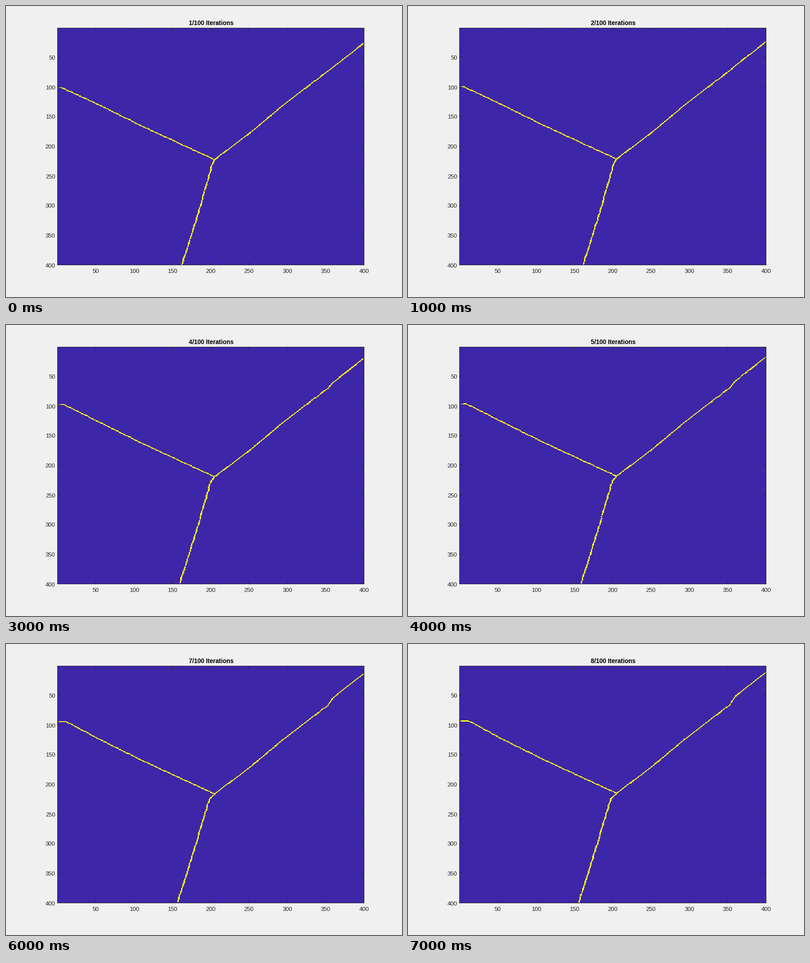
These frames come from a looping animation (873x641 px, 8 s). A matplotlib script:

```python
import numpy as np
import matplotlib.pyplot as plt
from matplotlib.animation import FuncAnimation
from matplotlib.colors import ListedColormap

W, H, DPI = 873, 641, 64
PX = 72 / DPI
LEFT, RIGHT, TOP, BOTTOM = 114, 790, 48, 571
N, STEPS = 400, 8
CW, CH = (RIGHT - LEFT) / N, (BOTTOM - TOP) / N
INK = "#262626"

rng = np.random.default_rng(4)
cells = np.arange(N)


def jitter(run, size):
    """Fixed roughness: one random offset per run of cells."""
    return np.repeat(rng.uniform(-size, size, N // run + 1), run)[:N]


ROUGH = [jitter(5, 0.4), jitter(6, 0.3), jitter(7, 0.4)]


def arms(k):
    """Key points of the three borders after k steps, in stage pixels."""
    rise, slide = 1.37 * k, 1.65 * k
    hub = (460, 338.5 - rise)
    west = [(112, 179 - rise), (121 + 1.9 * k, 179 - rise),
            (208, 219 - rise), (305, 267 - rise), hub]
    east = [hub, (536, 281 - rise), (619, 212 - rise), (709, 144 - rise),
            (722, 134 - 2 * rise), (791, 79.5 - 2 * rise)]
    south = [hub, (455 - 0.7 * slide, 347 - 0.6 * rise),
             (427.5 - slide, 445), (387 - slide, 572)]
    return west, east, south


def to_cells(points):
    x, y = np.transpose(points)
    return (x - LEFT) / CW - 0.5, (y - TOP) / CH - 0.5


def band(along, across, rough, half):
    """Mask [across, along] of the cells near a curve."""
    curve = np.interp(cells, along, across)
    reach = half * np.hypot(1, np.gradient(curve))
    near = np.abs(cells[:, None] - (curve + rough)) < reach
    return near & (cells >= along[0] - 0.5) & (cells <= along[-1] + 0.5)


def borders(k):
    west, east, south = map(to_cells, arms(k))
    grid = band(*west, ROUGH[0], 0.85) | band(*east, ROUGH[1], 0.8)
    grid |= band(*south[::-1], ROUGH[2], 0.9).T
    grid[[0, -1], :] = False
    grid[:, [0, -1]] = False
    return grid


fig = plt.figure(figsize=(W / DPI, H / DPI), dpi=DPI, facecolor="#f0f0f0")
ax = fig.add_axes([0, 0, 1, 1])
ax.axis("off")
image = ax.imshow(borders(0), cmap=ListedColormap(["#3e26a8", "#f9fb15"]),
                  vmin=0, vmax=1, interpolation="nearest", aspect="auto",
                  extent=(LEFT, RIGHT, BOTTOM, TOP))
ax.set_xlim(0, W)
ax.set_ylim(H, 0)


def line(x, y):
    ax.plot(x, y, color=INK, lw=PX, solid_capstyle="projecting",
            solid_joinstyle="miter", snap=False, zorder=3)


def label(x, y, text, ha="center", size=13, **style):
    return ax.text(x, y, text, ha=ha, va="baseline", fontsize=size * PX,
                   family="Liberation Sans", **style)


x0, x1, y0, y1 = 113.5, 789.5, 48.5, 570.5
line([x0, x1, x1, x0, x0], [y0, y0, y1, y1, y0])
for v in range(50, N + 1, 50):
    tx = min(np.floor(LEFT + (v - 0.5) * CW) + 0.5, x1)
    ty = min(np.floor(TOP + (v - 0.5) * CH) + 0.5, y1)
    for edge, d in ((y0, 6), (y1, -6)):
        line([tx, tx], [edge, edge + d])
    for edge, d in ((x0, 6), (x1, -6)):
        line([edge, edge + d], [ty, ty])
    label(tx, 588.5, str(v), color=INK)
    label(108.5, ty + 5, str(v), "right", color=INK)
title = label(452, 41.5, "", size=13.6, weight="bold", color="black")


def update(k):
    image.set_data(borders(k))
    title.set_text(f"{k + 1}/100 Iterations")
    return image, title


anim = FuncAnimation(fig, update, frames=STEPS, interval=1000, repeat=True,
                     repeat_delay=0, blit=False)
plt.show()
```
